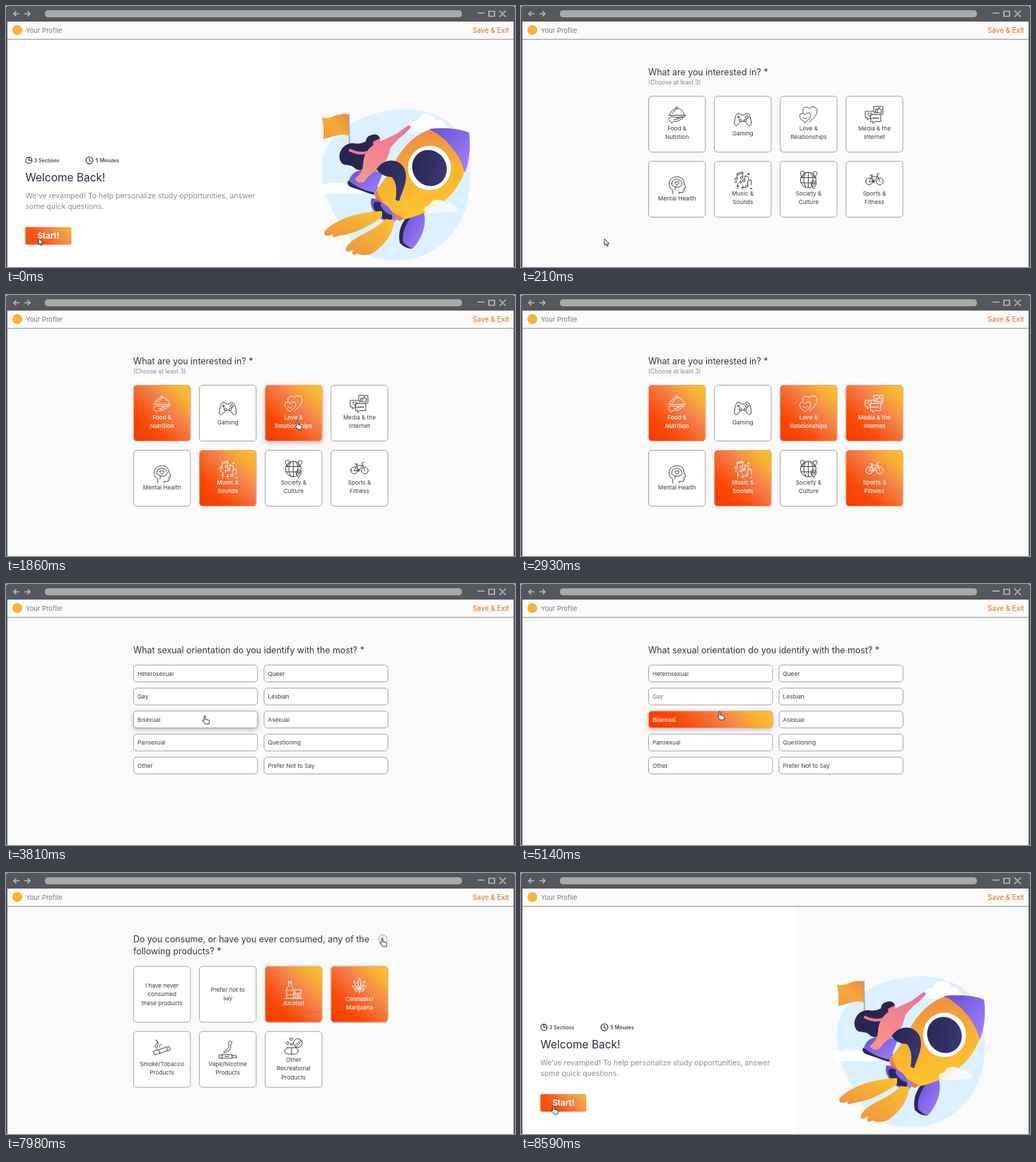
These frames come from a looping animation (720 by 369 pixels, 8690 ms). An HTML page:

```html
<!DOCTYPE html>
<html lang="en">
<head>
<meta charset="utf-8">
<title>Profile survey</title>
<style>
  html, body { margin: 0; width: 100%; height: 100%; overflow: hidden; background: #fafafa; }
  svg { display: block; width: 720px; height: 369px; font-family: Inter, "Open Sans", sans-serif; }
  .icon { fill: none; stroke: currentColor; stroke-width: .95; stroke-linecap: round; stroke-linejoin: round; }
  .label { font-size: 8.2px; fill: currentColor; }
  .hover { filter: drop-shadow(0 2px 3px rgba(0, 0, 0, .25)); }
</style>
</head>
<body>
<svg id="stage" viewBox="0 0 720 369">
  <defs id="defs">
    <linearGradient id="flag" x1="0" y1="1" x2="1" y2="0"><stop stop-color="#f19a3c"/><stop offset=".5" stop-color="#f5a93b"/><stop offset="1" stop-color="#ee8a45"/></linearGradient>
    <linearGradient id="hull" x1=".2" y1="0" x2=".45" y2="1"><stop stop-color="#ec8647"/><stop offset=".55" stop-color="#f8b233"/><stop offset="1" stop-color="#fdc62e"/></linearGradient>
    <linearGradient id="violet" x1="0" y1="0" x2="1" y2="1"><stop stop-color="#6a4ed0"/><stop offset="1" stop-color="#a284ff"/></linearGradient>
    <linearGradient id="flame" x1="1" y1="0" x2="0" y2="1"><stop stop-color="#fcc230"/><stop offset="1" stop-color="#ef9440"/></linearGradient>
    <linearGradient id="navy" x1="0" y1="0" x2="1" y2="1"><stop stop-color="#26254f"/><stop offset="1" stop-color="#3c3b78"/></linearGradient>
    <linearGradient id="rose" x1="0" y1="1" x2="1" y2="0"><stop stop-color="#f39a86"/><stop offset="1" stop-color="#ee6f9d"/></linearGradient>
  </defs>
  <rect width="720" height="369" fill="#fafafa"/>

  <g id="welcome">
    <path fill="#fff" d="M2 48h386v321H2z"/>
    <g id="art">
      <path fill="#ddf0fe" d="M447 228C447 190 478 168 508 157C552 140 600 142 630 167C652 188 659 225 655 262C650 312 616 350 570 358C530 364 500 354 482 324C468 298 447 275 447 228z"/>
      <path fill="#fff" d="M566 178q-3-8 6-11q4-6 10-4q4-12 16-10q9 1 10 9q9-3 12 5q7 4 4 11z"/>
      <path fill="#fff" d="M449 266q-8-2-7-8q3-7 11-6q8-5 14-1q8-4 14 1q9-2 13 4q12 1 11 10z"/>
      <path fill="url(#flag)" d="M447 157C457 163 472 148 485 154V183C473 179 463 185 449 188Q450 172 447 157z"/>
      <path stroke="#aaa6ae" stroke-width="1.6" d="M485 152l1 54"/>
      <path fill="#2a2959" d="M484 247Q481 252 488 256L520 267 526 256z"/>
      <path fill="url(#violet)" d="M485 247C490 230 508 228 533 236L522 264Q500 260 485 247z"/>
      <path fill="#2a2959" d="M567 298Q553 315 557 335Q566 344 575 343L590 291z"/>
      <path fill="url(#violet)" d="M572 299Q559 318 562 334Q570 342 575 343C588 330 597 307 590 289z"/>
      <path fill="url(#hull)" d="M602 174C574 182 554 208 541 238L523 261C530 284 545 300 562 302C602 293 636 272 649 233C643 208 622 185 602 174z"/>
      <path fill="url(#violet)" d="M598 174C620 171 645 174 655 179C658 200 655 222 649 236C643 210 622 185 598 174z"/>
      <ellipse cx="599" cy="229" rx="30.5" ry="31.5" fill="#fff"/>
      <ellipse cx="599" cy="229" rx="24" ry="26" fill="url(#navy)" transform="rotate(-30 599 229)"/>
      <path fill="#ec7d46" d="M525 260Q531 286 563 300L557 304Q528 292 521 266z"/>
      <path fill="url(#violet)" d="M517 272Q526 271 535 282T552 296Q554 305 546 307Q526 304 517 284Q515 276 517 272z"/>
      <ellipse cx="533" cy="290" rx="17" ry="8" fill="#2a2959" transform="rotate(45 533 290)"/>
      <ellipse cx="538" cy="287" rx="11" ry="4" fill="#8063e2" transform="rotate(45 538 287)"/>
      <path fill="url(#flame)" d="M532 290C500 291 468 301 452 317C447 324 452 327 463 323C460 327 464 328 470 325C490 323 512 313 532 298z"/>
      <path fill="url(#flame)" d="M537 301C520 320 490 325 481 342C478 349 486 348 492 344C487 351 491 354 497 350C503 353 514 353 521 348C540 334 548 318 549 303z"/>
      <path fill="#f8fbff" opacity=".85" d="M592 291q-3-7 6-9q5-10 15-8q7 1 9 6q8-4 12 2q7 3 4 8q-5 4-13 1q-16 4-33 0z"/>
      <path fill="#28264f" d="M520 190C508 188 505 197 492 194C478 193 470 206 472 216C475 230 488 221 494 230Q502 235 513 227L522 205z"/>
      <path fill="url(#rose)" d="M570 168L573 171Q566 180 556 187L544 200Q541 216 530 230Q514 236 507 249L499 250 493 245Q505 236 505 224Q506 203 524 194L552 181z"/>
      <path fill="#ed7f95" d="M520 185h8q4 7-3 11h-6z"/>
      <path fill="#28264f" d="M529 187Q526 180 518 182Q511 183 509 190Q514 197 521 191z"/>
      <path fill="url(#navy)" d="M524 231C535 214 557 215 564 231C570 246 560 262 556 276L551 274C553 262 553 250 546 242Q533 242 524 231z"/>
      <path stroke="#ef7999" stroke-width="4" stroke-linecap="round" fill="none" d="M487 204q12 6 24 3"/>
    </g>
    <g fill="none" stroke="#29263f" stroke-width="1.1" stroke-linecap="round">
      <circle cx="32.4" cy="218.3" r="4.4"/><path d="M32.4 214v4.3h4.3"/>
      <circle cx="118" cy="218.2" r="4.9"/><path d="M118 215v3.4l2 1.5"/>
    </g>
  </g>

  <g id="interests"></g>
  <g id="orientation"></g>
  <g id="products">
    <circle cx="533" cy="93.5" r="6" fill="none" stroke="#9a9a9e"/>
    <path stroke="#8a8a8e" stroke-width="1.2" d="M533 92.5v4M533 90v1"/>
  </g>

  <g id="tip">
    <rect x="552" y="89" width="103" height="69" rx="3" fill="#fff" stroke="#d4d4d6" style="filter:drop-shadow(0 1px 3px rgba(0,0,0,.2))"/>
  </g>

  <g id="chrome">
    <path fill="#fbfbfb" d="M2 22h716v24H2z"/>
    <path fill="#b0b0b4" d="M2 46.4h716v1.500H2z"/>
    <circle cx="16" cy="34" r="7" fill="#f9b233"/>
    <path fill="#55575d" d="M0 22V3q0-3 3-3h714q3 0 3 3v19zM0 22h2v347H0zM718 22h2v347h-2z"/>
    <rect x="55" y="6" width="590" height="10" rx="4.5" fill="#a8a9ab"/>
    <path fill="none" stroke="#b9babd" stroke-width="1.7" d="M19 11h-8m3.5-3.5L11 11l3.5 3.5M26 11h8m-3.5-3.5L34 11l-3.5 3.5M667 10h10M683 7.5h8v7h-8zM698 6.500l9 9m0-9l-9 9"/>
  </g>

  <g id="cursor" stroke="#222" stroke-width=".9" stroke-linejoin="round" fill="#fff">
    <path id="arrow" d="M0 0v9.500l2.200-2 1.600 3.300 1.500-.7-1.500-3.200h3z"/>
    <path id="hand" d="M-1 .6q1-1.500 2 0v4.600l4 .9q2 .6 1.700 2.600L6 12H.8l-3.600-4.600q-.2-1.500 1.200-.8l.6.7z"/>
  </g>
</svg>

<script>
const LOOP = 8690;
const $ = id => document.getElementById(id);

function add(parent, tag, attrs = {}, text) {
  const el = document.createElementNS('http://www.w3.org/2000/svg', tag);
  for (const k in attrs) el.setAttribute(k, attrs[k]);
  if (text) el.textContent = text;
  parent.appendChild(el);
  return el;
}

const write = (parent, x, y, size, fill, text, more) =>
  add(parent, 'text', { x, y, 'font-size': size, fill, ...more }, text);

const hot = [[0, '#f53a00'], [.28, '#f94a08'], [.6, '#f5804a'], [.82, '#f7b133'], [1, '#f9c22e']];
const soft = [[0, '#fa4e0c'], [.35, '#f9551a'], [.65, '#f28a45'], [1, '#f6b93a']];

// 45 degree gradient sized to its box, like the CSS one
let gradients = 0;
function warm(x, y, w, h, stops = hot) {
  const id = 'warm' + gradients++, cx = x + w / 2, cy = y + h / 2, r = (w + h) / 4;
  const g = add($('defs'), 'linearGradient', {
    id, gradientUnits: 'userSpaceOnUse', x1: cx - r, y1: cy + r, x2: cx + r, y2: cy - r
  });
  stops.forEach(([offset, color]) => add(g, 'stop', { offset, 'stop-color': color }));
  return `url(#${id})`;
}

const dot = (x, y, r) => `M${x - r} ${y}a${r} ${r} 0 1 0 ${2 * r} 0a${r} ${r} 0 1 0 ${-2 * r} 0z`;

function leaf() {
  let d = 'M13 18v6';
  [-105, -68, -34, 0, 34, 68, 105].forEach((deg, i) => {
    const a = deg * Math.PI / 180, len = [7, 11, 14, 16, 14, 11, 7][i];
    const at = (u, v) => `${(13 + u * Math.sin(a) + v * Math.cos(a)).toFixed(1)} ${(18 - u * Math.cos(a) + v * Math.sin(a)).toFixed(1)}`;
    d += `M13 18Q${at(len * .6, -3.6)} ${at(len, 0)}Q${at(len * .6, 3.6)} 13 18`;
  });
  return d;
}

// Line icons in a 26 by 26 box
const icons = {
  food: 'M3 13.5a10 9.5 0 0 1 20 0M1 13.5h24q-1 2.5-3 2.5h-9M6.5 11q1-4 5-5M1 18l4-2.5 5 .5 5 1.5q0 2-3 2H9M15 18l5-2.5q3 0 2 1.5l-8 5H8l-3 2.5-4-5' + dot(13, 2.7, 1.3),
  game: 'M6 4h3l1.5 2h5l1.5-2h3q3 1 4 7t1 8q-2 4-5 1l-4-5h-6l-4 5q-3 3-5-1q0-2 1-8t4-7zM7 7v4M5 9h4' + dot(9.5, 13.5, 1.8) + dot(16.5, 13.5, 1.8) + dot(19, 7, .6) + dot(19, 11, .6) + dot(17, 9, .6) + dot(21, 9, .6),
  love: 'M5 9C3 3 10 0 14 4Q17 0 22 2C28 6 25 14 14 23M8 24C0 19-1 14 2 11Q6 9 8 13Q11 8 15 11C18 15 13 20 8 24zM5 17q3 3 5.5 0',
  media: 'M12 7V1h13v11h-3M15 5h2v5h-2zM17 6l2-1V3q2-1 1.5 2h2.5l-.5 5H17M10 18H6l-3 2v-3H0V8h13v3M6.5 15Q2 12 4 10.5q2-.5 2.5 1q1-1.5 2.5-1Q11 12 6.5 15M8 12.5h14v10h-8l-3 3v-3H8z' + dot(12, 17.5, .8) + dot(15, 17.5, .8) + dot(18, 17.5, .8),
  mind: 'M7 25.5v-5q-6-4-5-11q2-8 11-8q9 0 10 9l2.5 6-2.5 1v4q0 2-3 2h-4v2M7 14q-3-1-1-4q-1-3 3-4q3-3 6 0q4-1 4 3q3 2 0 5q-1 3-5 2h-3zM13 13.5q-4-3-2.5-5q2-1 2.5 1q1-2 2.5-1q1.5 2-2.5 5M11 16l-1 4',
  music: 'M5 10V2.5l8-2v8M5 4.5l8-2M16 13V6l5 2v4M20 21V13l5-1v7M6 17v7M4.5 20.5h3M2 14l2 2m0-2l-2 2M10 13v4M8 15h4M21 2v3M19.5 3.5h3M13 20v5M10.5 22.5h5M24 23l2 2m0-2l-2 2' + dot(3.4, 10.5, 1.8) + dot(11.3, 8.8, 1.8) + dot(14.4, 13, 1.6) + dot(18.4, 21, 1.7),
  globe: dot(12.5, 13, 11) + 'M12.5 2v22M2 9.5h21M2 17h16M9 3Q3 13 9 23M16 3Q22 11 17 21M20 25q-5-6-3.5-9q3.5-4 7 0q1.5 3-3.5 9zM4 9Q0 4 2 1.5q3-2 5 0q1 3-3 7.5M21 9Q18 4 20 2q3-2 5 0q1 3-4 7' + dot(20, 17.5, 1.3),
  bike: dot(5.5, 15, 4.8) + dot(20.5, 15, 4.8) + 'M5.5 15l4-7h8l-5.5 7zM12 15L8.5 6M7 6h3.5M20.5 15L16.5 4.5l3-1M1 15h1' + dot(12, 15, 1.2),
  drink: 'M6 1h4v7q3 2 3 5v12H3V13q0-3 3-5zM6 3.5h4M3 14h10M3 20h10M15 13h9l-1 12h-7zM15.5 18h8M18 20h3v3h-3zM0 25.5h26',
  leaf: leaf(),
  smoke: 'M1 18l22-7 2 5-22 7zM8 16l2 5M19 12.5l2 5M5 14Q1 11 5 8T4 2Q9 5 7 9t-1 5M10 12q-1-3 2-4',
  vape: 'M1 20h18v5H1zM19 21h6v3h-6M5 20v5M9 22.5h5M7 18q1-4 5-6t2-7q0-5 4-4q2 1-1 5q1 7-4 9t-4 3',
  pills: 'M5 15h10a4.5 4.5 0 0 1 0 9H5a4.5 4.5 0 0 1 0-9zM10 15v9M14 13l9-9' + dot(19, 8.5, 6.2) + dot(9.5, 3, 1.8) + dot(4.5, 8.5, 1.8) + dot(10, 10, 1.4) + 'M15.5 14.5l9-9'
};

const cards = [];
function card(page, x, y, w, h, lines, base, icon, iconY, left) {
  const g = add($(page), 'g');
  const face = (fill, stroke, color, weight) => {
    const layer = add(g, 'g', { color });
    add(layer, 'rect', { x, y, width: w, height: h, rx: 4.5, fill, stroke });
    if (icon) add(layer, 'path', { class: 'icon', d: icons[icon], transform: `translate(${x + w / 2 - 13} ${iconY - 13})` });
    lines.forEach((s, i) => add(layer, 'text', {
      class: 'label', x: left ? x + 5.5 : x + w / 2, y: base + 12.4 * i,
      'text-anchor': left ? 'start' : 'middle', 'font-weight': weight
    }, s));
    return layer;
  };
  const plain = face('#fff', '#a2a2a6', '#3a3a42', 400);
  const on = face(warm(x, y, w, h), '#f7a884', '#fff', 500);
  const c = { page, x, y, w, h, g, plain, on };
  cards.push(c);
  return c;
}

const column = i => 180.5 + 93.1 * i;
const tile = (page, col, y, lines, base, icon, iconY) =>
  card(page, column(col), y, 80.3, 79, lines, base, icon, iconY);

const ink = '#37373f';
const title = (page, y, s) => write($(page), 180, y, 12.4, ink, s);

title('interests', 97.7, 'What are you interested in? *');
write($('interests'), 180, 111, 8.3, '#88888c', '(Choose at least 3)');
const food = tile('interests', 0, 127.5, ['Food &', 'Nutrition'], 176, 'food', 154);
tile('interests', 1, 127.5, ['Gaming'], 182.5, 'game', 161);
const love = tile('interests', 2, 127.5, ['Love &', 'Relationships'], 176, 'love', 154);
const media = tile('interests', 3, 127.5, ['Media & the', 'Internet'], 176, 'media', 154);
tile('interests', 0, 219.5, ['Mental Health'], 274.5, 'mind', 253);
const music = tile('interests', 1, 219.5, ['Music &', 'Sounds'], 268, 'music', 247);
tile('interests', 2, 219.5, ['Society &', 'Culture'], 268, 'globe', 246);
const sports = tile('interests', 3, 219.5, ['Sports &', 'Fitness'], 268, 'bike', 246);

title('orientation', 97.7, 'What sexual orientation do you identify with the most? *');
const options = ['Heterosexual', 'Queer', 'Gay', 'Lesbian', 'Bisexual', 'Asexual', 'Pansexual', 'Questioning', 'Other', 'Prefer Not to Say']
  .map((s, i) => {
    const y = 114.7 + 32.5 * (i >> 1);
    return card('orientation', i % 2 ? 365 : 180.5, y, 175.3, 23.8, [s], y + 14.9, null, 0, true);
  });
const gay = options[2], bisexual = options[4];

title('products', 97.7, 'Do you consume, or have you ever consumed, any of the');
title('products', 115, 'following products? *');
tile('products', 0, 132, ['I have never', 'consumed', 'these products'], 162);
tile('products', 1, 132, ['Prefer not to', 'say'], 168);
const alcohol = tile('products', 2, 132, ['Alcohol'], 187, 'drink', 165);
const cannabis = tile('products', 3, 132, ['Cannabis/', 'Marijuana'], 180.5, 'leaf', 159);
tile('products', 0, 224, ['Smoke/Tobacco', 'Products'], 272.5, 'smoke', 247);
tile('products', 1, 224, ['Vape/Nicotine', 'Products'], 272.5, 'vape', 250);
tile('products', 2, 224, ['Other', 'Recreational', 'Products'], 267, 'pills', 245);

const w = $('welcome');
write(w, 39.7, 221, 7.1, '#29263f', '3 Sections', { 'font-weight': 500 });
write(w, 126.5, 221, 7.1, '#29263f', '5 Minutes', { 'font-weight': 500 });
write(w, 27.5, 248, 15.5, '#2b2a45', 'Welcome Back!');
write(w, 27.5, 272.4, 10.45, '#8d8d92', 'We’ve revamped! To help personalize study opportunities, answer');
write(w, 27.5, 286.6, 10.45, '#8d8d92', 'some quick questions.');
add(w, 'rect', { x: 27.3, y: 312.5, width: 65.2, height: 25, rx: 2, fill: warm(27.3, 312.5, 65.2, 25, soft) });
write(w, 60, 329, 11.4, '#fff', 'Start!', { 'font-weight': 700, 'text-anchor': 'middle' });

write($('chrome'), 28, 38, 9.4, '#77777b', 'Your Profile');
write($('chrome'), 711.7, 37.7, 9.8, '#f07a2a', 'Save & Exit', { 'text-anchor': 'end', 'font-weight': 500 });

['We ask this to help', 'match you with', 'studies that suit', 'your lifestyle.'].forEach((s, i) =>
  write($('tip'), 560, 106 + 13.5 * i, 8.2, '#55555b', s));

// [page, from]
const pages = [['welcome', 0], ['interests', 70], ['orientation', 3330], ['products', 6700], ['welcome', 8520]];

// [first step, last step, steps, x, y]
const moves = [
  [70, 210, 3, 118, 329],
  [280, 560, 5, 218, 180],
  [900, 1040, 3, 313, 270],
  [1450, 1696, 4, 412, 178],
  [2110, 2285, 3, 505, 180],
  [2660, 2750, 2, 505, 268],
  [2930, 2930, 1, -60, 0],
  [3330, 3330, 1, 112, 284],
  [3410, 3810, 6, 281, 186],
  [4140, 4210, 2, 281, 157],
  [4540, 4740, 3, 281, 180],
  [5340, 5970, 10, 88, 375],
  [6700, 6700, 1, 532, 92],
  [8520, 8520, 1, 46, 329]
];

// [card, first step, last step, steps]
const picks = [
  [food, 630, 700, 2], [music, 1110, 1180, 2], [love, 1778, 1860, 2],
  [media, 2372, 2460, 2], [sports, 2840, 2930, 2], [gay, 4280, 4280, 1],
  [bisexual, 5140, 5140, 1], [alcohol, 6700, 6700, 1], [cannabis, 6700, 6700, 1]
];

function stepped(t, a, b, n) {
  if (t < a) return 0;
  return n < 2 ? 1 : Math.min(n, 1 + Math.floor((t - a) / (b - a) * (n - 1) + .001)) / n;
}

function draw(t) {
  const page = pages.filter(p => t >= p[1]).pop()[0];
  for (const [id] of pages) $(id).style.display = id === page ? '' : 'none';

  let x = 46, y = 328;
  for (const [a, b, n, tx, ty] of moves) {
    if (t < a) break;
    const k = stepped(t, a, b, n);
    x += (tx - x) * k;
    y += (ty - y) * k;
  }
  $('cursor').setAttribute('transform', `translate(${x.toFixed(2)} ${y.toFixed(2)})`);

  for (const c of cards) c.on.setAttribute('opacity', 0);
  for (const [c, a, b, n] of picks) c.on.setAttribute('opacity', stepped(t, a, b, n));
  if (t >= 5140) gay.on.setAttribute('opacity', 0);
  gay.plain.setAttribute('color', t >= 5140 ? '#96683a' : '#3a3a42');

  let hand = page === 'products' || t >= 8520;
  for (const c of cards) {
    const over = c.page === page && x > c.x && x < c.x + c.w && y > c.y && y < c.y + c.h;
    c.g.setAttribute('class', over ? 'hover' : '');
    hand = hand || over;
  }
  $('hand').style.display = hand ? '' : 'none';
  $('arrow').style.display = hand ? 'none' : '';

  $('tip').setAttribute('opacity', stepped(t, 6920, 7120, 4) - stepped(t, 7910, 7980, 2));
}

const start = performance.now();
function tick() {
  draw((performance.now() - start) % LOOP);
  requestAnimationFrame(tick);
}
tick();
</script>
</body>
</html>
```
